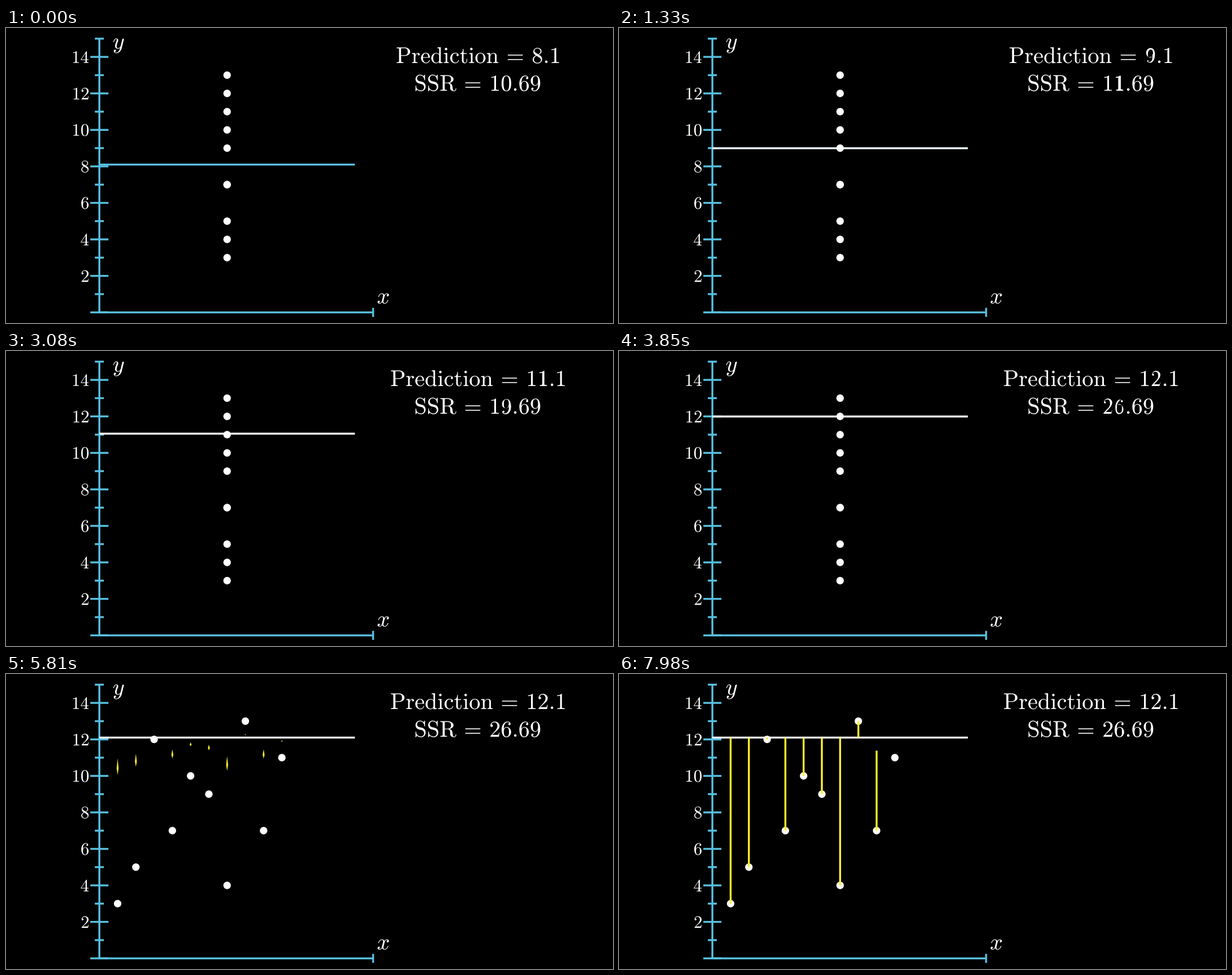
A matplotlib script for the animation above (8000 ms loop, 1074 by 522 pixels).

```python
import numpy as np
import matplotlib
import matplotlib.pyplot as plt
from matplotlib.animation import FuncAnimation
from matplotlib.collections import LineCollection, PolyCollection
from matplotlib.patches import Circle, PathPatch
from matplotlib.path import Path
from matplotlib.textpath import TextPath

matplotlib.rcParams["mathtext.fontset"] = "cm"

W, H, DPI = 1074, 522, 100
LOOP_MS, TICK_MS, STEP_MS = 8000, 20, 70
BLUE = np.array([88, 192, 224]) / 255
YELLOW = np.array([255, 241, 45]) / 255
WHITE = np.ones(3)

X0, Y0, UNIT = 165.2, 503.2, 32.29
STROKE = 3.4 * 72 / DPI
DOT_RADIUS = 6.6
EM = 40.35
CAPTION_X = 834.9
DATA_X = np.arange(1, 11)
DATA_Y = np.array([3, 5, 12, 7, 10, 9, 4, 13, 7, 11])
STACK_X = 7

# Timeline, counted in 70 ms steps
RAISE_START, RAISE_LEN, RAISES = 10.5, 12, 4
SECOND = 15
SPREAD_START = RAISE_START + RAISES * RAISE_LEN
FLASH_START = SPREAD_START + SECOND
DRAW_START = FLASH_START + 2 * SECOND


def px(x):
    return X0 + UNIT * x


def py(y):
    return Y0 - UNIT * y


def smooth(t):
    """Sigmoid ease from 0 to 1."""
    t = np.clip(t, 0, 1)
    edge = 1 / (1 + np.exp(5))
    return float((1 / (1 + np.exp(-10 * (t - 0.5))) - edge) / (1 - 2 * edge))


# ---- text as outlines ----

def outline(tex, em=EM):
    """Closed contours of a formula, baseline at y = 0, y pointing down.

    Every curve gets the same number of points, so that a point's index
    tells how many curves lie before it.
    """
    steps = np.linspace(0, 1, 9)[1:]
    contours = []
    for curve, code in TextPath((0, 0), f"${tex}$", size=400).iter_bezier():
        ends = curve.control_points
        if code == Path.MOVETO:
            contours.append([ends[:1]])
        elif not np.allclose(ends, ends[0]):
            contours[-1].append(curve(steps))
    return [np.concatenate(c) * np.array([1, -1]) * em / 400
            for c in contours if len(c) > 1]


def compound(contours):
    return Path.make_compound_path(*[Path(c, closed=True) for c in contours])


def moved(contours, dx, dy):
    return [c + np.array([dx, dy]) for c in contours]


def bounds(contours):
    pts = np.concatenate(contours)
    return pts.min(axis=0), pts.max(axis=0)


def resample(contour, n=240):
    """Spread n points evenly over the curves of a contour."""
    index = np.arange(len(contour))
    at = np.linspace(0, index[-1], n)
    return np.column_stack([np.interp(at, index, contour[:, i]) for i in (0, 1)])


def caption(label, number, baseline):
    """One centred line of text as a list of glyphs, each a list of contours."""
    gap = r"\hspace{0.18}"
    contours = outline(rf"\mathrm{{{label}{gap}={gap}{number}}}")
    lo, hi = bounds(contours)
    contours = moved(contours, CAPTION_X - (lo[0] + hi[0]) / 2, baseline)
    glyphs = []
    for char in f"{label}={number}":
        count = len(outline(rf"\mathrm{{{char}}}"))
        glyphs.append(contours[:count])
        contours = contours[count:]
    return glyphs


def flat(glyphs):
    return [c for g in glyphs for c in g]


def pad(glyph, count):
    dot = np.repeat(glyph[-1][-1:], len(glyph[-1]), axis=0)
    return glyph + [dot] * (count - len(glyph))


def pair_up(a, b):
    """Matching resampled contours for a morph between two lines of text."""
    n = max(len(a), len(b))
    a = [a[i * len(a) // n] for i in range(n)]
    b = [b[i * len(b) // n] for i in range(n)]
    pairs = []
    for g, h in zip(a, b):
        g, h = [resample(c) for c in g], [resample(c) for c in h]
        count = max(len(g), len(h))
        pairs += zip(pad(g, count), pad(h, count))
    return pairs


class MorphingText:
    def __init__(self, ax, label, numbers, baseline):
        lines = [caption(label, n, baseline) for n in numbers]
        self.still = [compound(flat(line)) for line in lines]
        self.pairs = [pair_up(a, b) for a, b in zip(lines, lines[1:])]
        self.patch = ax.add_patch(PathPatch(self.still[0], fc="white", lw=0))

    def show(self, k, u):
        if u < 1e-4:
            path = self.still[k]
        elif u > 1 - 1e-4:
            path = self.still[k + 1]
        else:
            path = compound([(1 - u) * a + u * b for a, b in self.pairs[k]])
        self.patch.set_path(path)


# ---- stage ----

fig = plt.figure(figsize=(W / DPI, H / DPI), dpi=DPI, facecolor="black")
ax = fig.add_axes([0, 0, 1, 1])
ax.set_xlim(0, W)
ax.set_ylim(H, 0)
ax.axis("off")


def put_label(tex, em, cy, cx=None, right=None):
    contours = outline(tex, em)
    lo, hi = bounds(contours)
    dx = right - hi[0] if cx is None else cx - (lo[0] + hi[0]) / 2
    contours = moved(contours, dx, cy - (lo[1] + hi[1]) / 2)
    ax.add_patch(PathPatch(compound(contours), fc="white", lw=0))


def add_strokes(segments, color, zorder):
    strokes = LineCollection(segments, colors=[color], linewidths=STROKE,
                             capstyle="butt", snap=False, zorder=zorder)
    return ax.add_collection(strokes, autolim=False)


def draw_axes():
    segments = [[(X0, py(15)), (X0, Y0)], [(X0, Y0), (px(15), Y0)],
                [(px(15), Y0 - 8), (px(15), Y0 + 8)]]
    for v in range(16):
        half = 8 if v % 2 else 16
        segments.append([(X0 - half, py(v)), (X0 + half, py(v))])
        if v % 2 == 0 and v > 0:
            put_label(rf"\mathrm{{{v}}}", 31, py(v) + 0.3, right=146.1)
    add_strokes(segments, BLUE, 2)
    put_label("y", EM, 31.5, cx=199.2)
    put_label("x", EM, 478.7, cx=667.5)


draw_axes()
prediction = MorphingText(ax, "Prediction", [f"{8.1 + k:.1f}" for k in range(5)], 62.2)
ssr = MorphingText(ax, "SSR", [f"{10.69 + k * k:.2f}" for k in range(5)], 111.2)

guess = add_strokes([], BLUE, 3)
dots = [ax.add_patch(Circle((0, py(y)), DOT_RADIUS, fc="white", lw=0, zorder=4))
        for y in DATA_Y]
residuals = add_strokes([], YELLOW, 5)
sparks = PolyCollection([], facecolors=[YELLOW], linewidths=0, zorder=5)
ax.add_collection(sparks, autolim=False)


def spark_shapes(t, top):
    """Slim kites that run from each dot to the line."""
    if not 0 < t < 1:
        return []
    head = 1.1 * smooth(t)
    lo, hi = max(head - 0.1, 0), min(head, 1)
    shapes = []
    for x, y in zip(px(DATA_X), py(DATA_Y)):
        tail, belly, tip = (y + (top - y) * s for s in (lo, lo + 0.4 * (hi - lo), hi))
        half = min(1.7, abs(tip - tail) * 0.25)
        shapes.append([(x, tail), (x - half, belly), (x, tip), (x + half, belly)])
    return shapes


def residual_lines(t, top):
    """Residuals drawn one after another under a single ease."""
    done = smooth(t) * len(DATA_X)
    lines = []
    for i, (x, y) in enumerate(zip(px(DATA_X), py(DATA_Y))):
        part = min(max(done - i, 0), 1)
        if part > 0:
            lines.append([(x, y), (x, y + (top - y) * part)])
    return lines


def update(frame):
    step = (frame * TICK_MS + TICK_MS // 2) // STEP_MS

    phase = (step - RAISE_START) / RAISE_LEN
    k = int(np.clip(np.floor(phase), 0, RAISES - 1))
    u = smooth(phase - k)
    prediction.show(k, u)
    ssr.show(k, u)

    top = py(8.1 + k + u)
    guess.set_segments([[(X0, top), (px(14), top)]])
    guess.set_color([WHITE if k else BLUE + (WHITE - BLUE) * u])

    spread = smooth((step - SPREAD_START) / SECOND)
    for dot, x, y in zip(dots, DATA_X, DATA_Y):
        dot.set_center((px(STACK_X + (x - STACK_X) * spread), py(y)))

    sparks.set_verts(spark_shapes((step - FLASH_START) / SECOND, top))
    residuals.set_segments(residual_lines((step - DRAW_START) / SECOND, top))
    return prediction.patch, ssr.patch, guess, *dots, sparks, residuals


anim = FuncAnimation(fig, update, frames=LOOP_MS // TICK_MS, interval=TICK_MS,
                     repeat=True, repeat_delay=0, blit=False)
plt.show()
```
